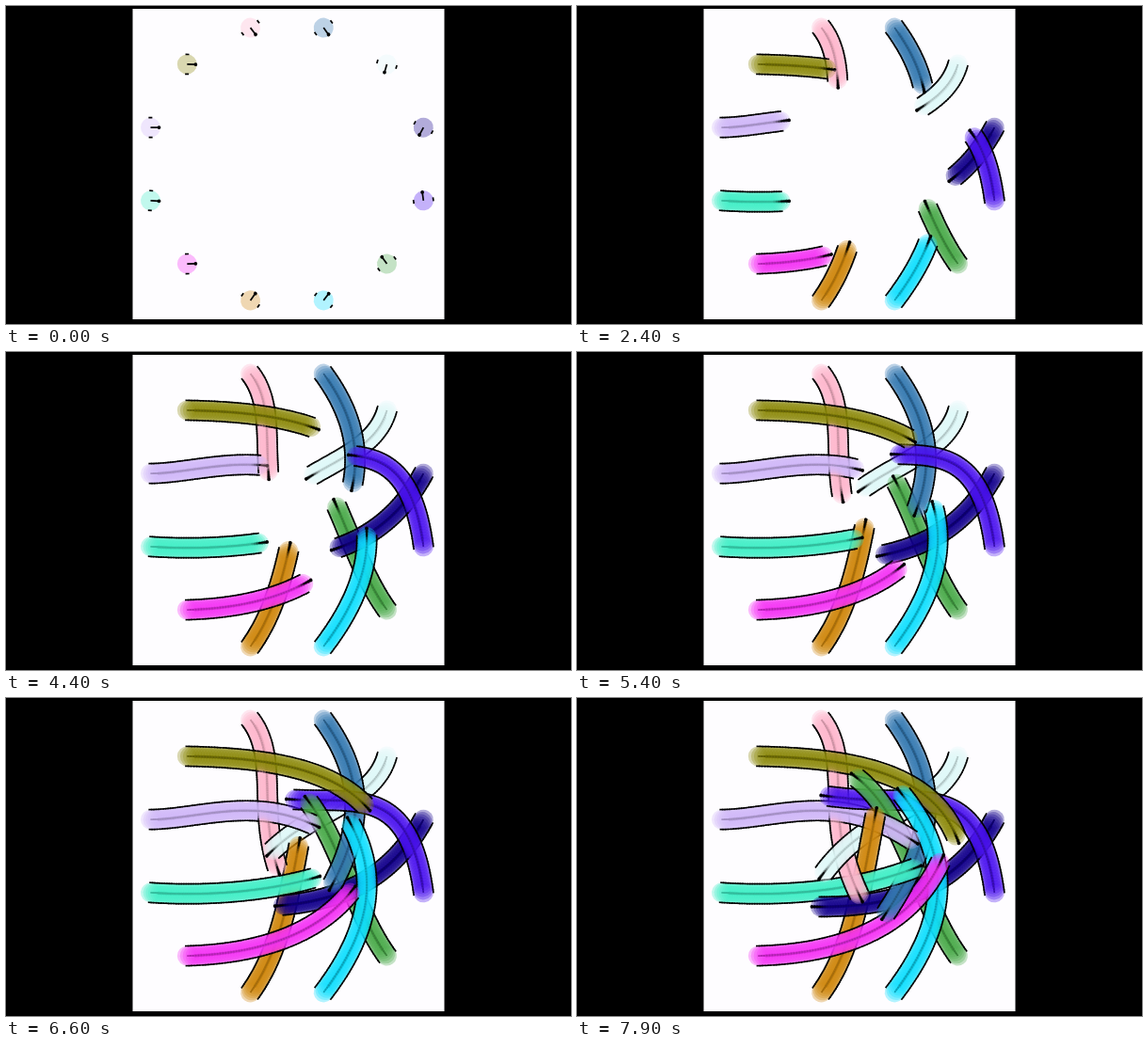
These frames come from a looping animation (600x338 px, 8 s). An HTML page with a canvas:

```html
<!DOCTYPE html>
<html lang="en">
<head>
<meta charset="utf-8">
<title>Robot trails</title>
<style>
  html, body { margin: 0; width: 100%; height: 100%; overflow: hidden; background: #000; }
  canvas { display: block; width: 600px; height: 338px; }
</style>
</head>
<body>
<canvas id="stage" width="600" height="338"></canvas>
<script>
const ctx = document.getElementById('stage').getContext('2d');
const LOOP = 8000, STEP = 100, STEPS = LOOP / STEP;
const RADIUS = 10.5, RING = 150, SPAN = 2 * RING;

// Each robot crosses the ring towards the opposite side, swerving sideways.
// The swerve strength is given at the start, middle and end of the crossing.
// Listed clockwise from -15 degrees, 30 degrees apart.
const robots = [
  ['#14008c', -315, -165, -185],
  ['#4c14f0', 720, -85, 440],
  ['#4caa4c', 50, 198, 383],
  ['#10e0ff', 388, 307, 230],
  ['#d08a10', 112, 15, 20],
  ['#f532f5', 283, 300, 325],
  ['#40f0c8', 103, 107, 155],
  ['#cfb8f8', -85, -280, -18],
  ['#8c8a08', -288, -380, -475],
  ['#ffb9cc', -125, 231, -124],
  ['#3478b0', -372, -190, -170],
  ['#dffafa', -165, 247, -93]
].map(([color, ...swerve], i) => ({
  color,
  bearing: (30 * i + 165) * Math.PI / 180,
  poses: drive(swerve)
}));

// Sideways distance from the straight crossing at progress u (0 to 1).
function offset([a, b, c], u) {
  const v = 1 - u;
  return u * v * (a * v * v + 2 * b * u * v + c * u * u);
}

// Constant speed along the curve; wider swerves are driven faster.
function drive(swerve) {
  const mean = swerve.reduce((sum, s) => sum + s) / swerve.length;
  const speed = 2.42 + 0.0016 * Math.abs(mean);
  const poses = [];
  for (let step = 0, r = 0; step < STEPS; step++) {
    const u = r / SPAN, h = 0.01;
    const slope = (offset(swerve, u + h) - offset(swerve, u - h)) / (2 * h * SPAN);
    const turn = Math.atan(slope);
    poses.push({ x: r - RING, y: offset(swerve, u), turn });
    r += speed * Math.cos(turn);
  }
  return poses;
}

function disc(x, y, r) {
  ctx.beginPath();
  ctx.arc(x, y, r, 0, Math.PI * 2);
  ctx.fill();
}

function stamp({ color, bearing, poses }, step) {
  const { x, y, turn } = poses[step];
  ctx.save();
  ctx.translate(298.4, 168);
  ctx.rotate(bearing);
  ctx.translate(x, y);
  ctx.rotate(turn);
  ctx.globalAlpha = 0.32;
  ctx.fillStyle = color;
  disc(0, 0, RADIUS);
  ctx.globalAlpha = 1;
  ctx.fillStyle = '#000';
  for (const side of [-1, 1]) ctx.fillRect(-2, side * RADIUS - 0.85, 4, 1.7);
  ctx.fillRect(0, -0.85, 9, 1.7);
  disc(9, 0, 1.9);
  ctx.restore();
}

function draw(last) {
  ctx.fillStyle = '#000';
  ctx.fillRect(0, 0, 600, 338);
  ctx.fillStyle = '#fefdff';
  ctx.fillRect(134.5, 3, 331, 330);
  for (let step = 0; step <= last; step++) {
    for (const robot of robots) stamp(robot, step);
  }
}

let shown = -1;
const began = performance.now();
function tick() {
  const step = Math.floor((performance.now() - began) % LOOP / STEP);
  if (step !== shown) draw(shown = step);
  requestAnimationFrame(tick);
}
tick();
</script>
</body>
</html>
```
